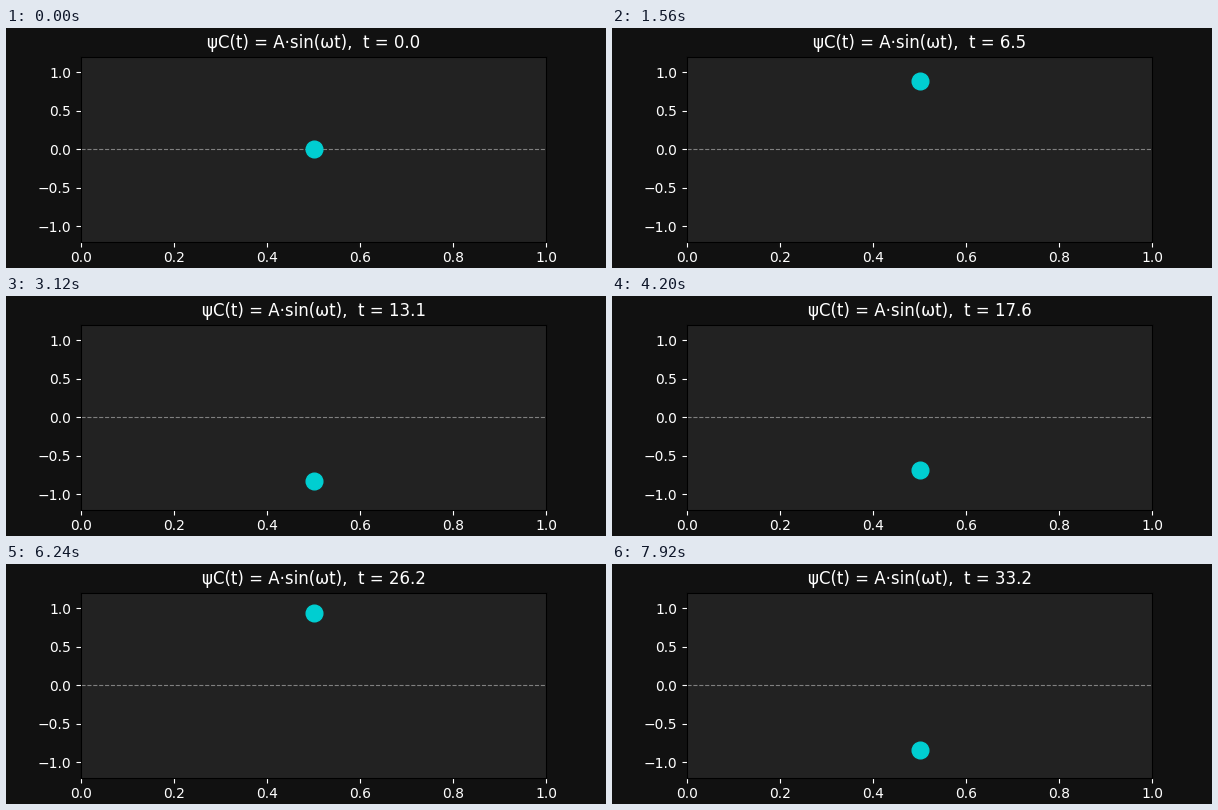
These frames come from a looping animation (600 px wide and 240 px high, 8 s). A matplotlib script:

```python
import numpy as np
import matplotlib.pyplot as plt
from matplotlib.animation import FuncAnimation

plt.rcParams["font.family"] = "DejaVu Sans"

TICK = 40             # ms per drawn frame
HOLD = 3              # drawn frames per motion step
LOOP = 8000           # ms
DT = 80 / 159         # time gained per step
AMP = 1.0
OMEGA = 2 * np.pi / 20

fig, ax = plt.subplots(figsize=(6, 2.4), dpi=100)
fig.patch.set_facecolor("#111111")
ax.set_facecolor("#222222")
ax.set_xlim(0, 1)
ax.set_ylim(-1.2, 1.2)
ax.tick_params(colors="white")
ax.axhline(0, color="gray", linestyle="--", linewidth=0.8)
dot, = ax.plot([0.5], [0], "o", color="darkturquoise", markersize=12)
title = ax.set_title("", color="white")


def update(frame):
    t = frame // HOLD * DT
    dot.set_data([0.5], [AMP * np.sin(OMEGA * t)])
    title.set_text(f"ψC(t) = A·sin(ωt),  t = {t:.1f}")
    return dot, title


anim = FuncAnimation(fig, update, frames=LOOP // TICK, interval=TICK,
                     repeat=True, repeat_delay=0, blit=False)
plt.show()
```
